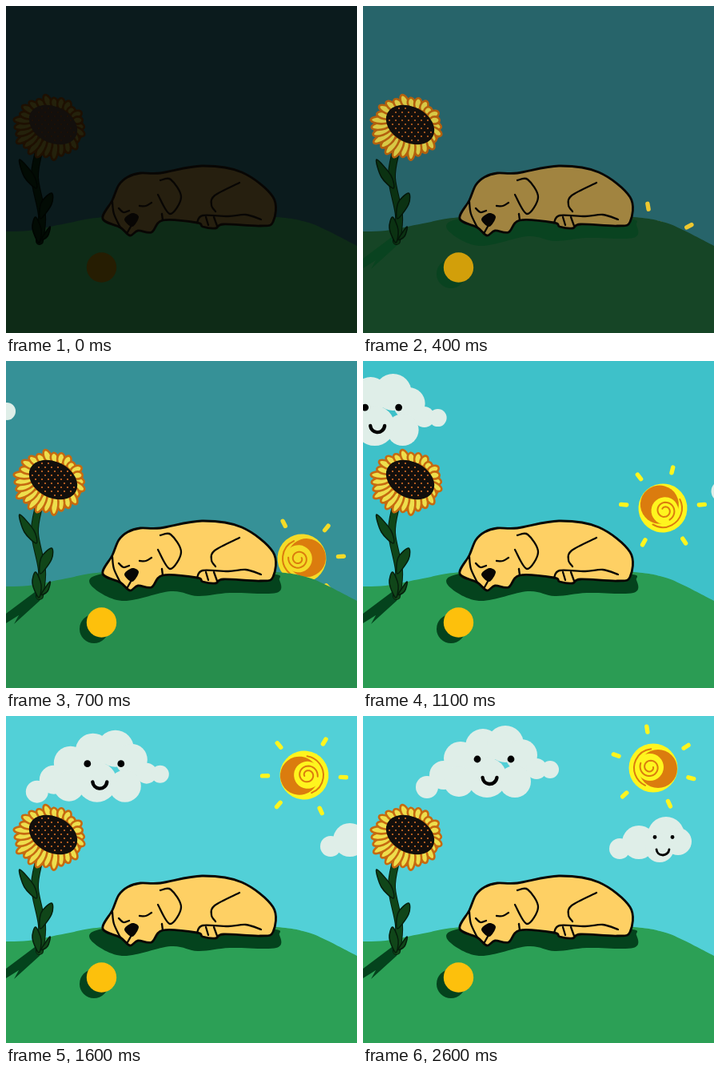
Write an HTML page with a canvas that moves like this. It is 439x409 px and loops after 3000 ms.

```html
<!DOCTYPE html>
<html lang="en">
<head>
<meta charset="utf-8">
<title>Sunny morning</title>
<style>
html, body { margin: 0; width: 100%; height: 100%; overflow: hidden; background: #0b1b1d; }
canvas { display: block; }
</style>
</head>
<body>
<canvas id="stage" width="439" height="409"></canvas>
<script>
const ctx = document.getElementById('stage').getContext('2d');
const LOOP = 3000, STEP = 100, LAST = 2600, NIGHT = 0.15;
const TAU = Math.PI * 2, RAD = Math.PI / 180, INK = '#080604';

const clamp = v => Math.min(1, Math.max(0, v));
const mix = (a, b, k) => a.map((v, i) => v + (b[i] - v) * k);
const rgb = c => `rgb(${c.map(Math.round).join(',')})`;
// Day colour, dimmed at night, fully lit at time `end`
const lit = (c, t, end) => rgb(c.map(v => v * (NIGHT + (1 - NIGHT) * clamp(t / end))));

// Straight runs between rows of [time, ...values]
function at(t, rows) {
  let i = 1;
  while (i < rows.length - 1 && rows[i][0] < t) i++;
  const [t0, ...a] = rows[i - 1], [t1, ...b] = rows[i];
  return mix(a, b, Math.min(1, (t - t0) / (t1 - t0)));
}

// Smooth curve through "x,y x,y ..." points
function curve(text, closed) {
  const p = text.split(' ').map(s => s.split(',').map(Number));
  const n = p.length, path = new Path2D();
  const get = i => closed ? p[(i + n) % n] : p[Math.min(n - 1, Math.max(0, i))];
  path.moveTo(...p[0]);
  for (let i = 0; i < (closed ? n : n - 1); i++) {
    const [a, b, c, d] = [get(i - 1), get(i), get(i + 1), get(i + 2)];
    path.bezierCurveTo(b[0] + (c[0] - a[0]) / 6, b[1] + (c[1] - a[1]) / 6,
      c[0] - (d[0] - b[0]) / 6, c[1] - (d[1] - b[1]) / 6, c[0], c[1]);
  }
  if (closed) path.closePath();
  return path;
}
const curves = (list, closed) => list.map(s => curve(s, closed));

function fill(path, color) { ctx.fillStyle = color; ctx.fill(path); }
function line(path, color, width) {
  ctx.strokeStyle = color;
  ctx.lineWidth = width;
  ctx.stroke(path);
}
function oval(x, y, rx, ry, turn = 0) {
  const path = new Path2D();
  path.ellipse(x, y, rx, ry, turn, 0, TAU);
  return path;
}
function arc(x, y, r, from, to) {
  const path = new Path2D();
  path.arc(x, y, r, from, to);
  return path;
}
const dot = (x, y, r, color) => fill(oval(x, y, r, r), color);

const skyLight = [[0, 11, 27, 29], [400, 39, 100, 106], [700, 54, 145, 151], [1100, 62, 193, 201], [1200, 82, 208, 215]];
const groundLight = [[0, 14, 43, 23], [400, 22, 69, 38], [700, 39, 142, 77], [1200, 44, 160, 86]];
const SHADE = 'rgb(4,67,29)';

const hill = curve('-10,282 28,281 75,272 122,264 230,258 338,264 375,270 400,280 439,300 450,306');
hill.lineTo(450, 420);
hill.lineTo(-10, 420);

const dog = {
  shade: curve('106,280 122,266 220,262 330,266 342,274 338,290 280,290 240,294 206,288 145,300', true),
  body: curve('168,209 193,209 245,200 295,208 334,239 334,270 318,275 272,273 262,278 246,276 239,271 196,268 182,283 165,281 155,287 143,277 121,266 133,243 141,224 152,214', true),
  lines: curves([
    '193,218 206,217 219,239 205,260 190,236',
    '133,245 135,260 143,277',
    '292,221 261,237 257,249 262,257',
    '239,271 246,262 278,263 300,261 319,267',
    '250,264 253,274', '260,264 264,275',
    '195,260 196,268', '157,274 152,283',
    '141,253 147,258 154,256', '167,250 175,250 182,246'
  ]),
  nose: curve('148,267 158,259 166,264 158,276', true)
};

const plant = {
  stem: curve('41,182 36,215 45,262 42,294'),
  leaves: curves(['38,228 23,214 17,192 35,212', '43,266 44,246 57,234 57,248', '41,296 33,278 37,264 44,280', '44,292 55,276 52,288'], true),
  shade: new Path2D('M46 290 L36 289 L0 316 V328 L16 318 L10 329 L42 300Z')
};

// Clouds are heaps of round puffs: x, y, radius
const bigCloud = {
  puffs: [[80, 89, 14], [101, 74, 18], [122, 53, 21], [150, 38, 22], [178, 35, 23], [198, 49, 20], [217, 66, 13], [234, 67, 11], [190, 82, 20], [155, 77, 25], [120, 82, 19]],
  x: 164, y: 54, eyeGap: 21, eye: 4.4, smile: [158.5, 76, 9], width: 4.4
};
const smallCloud = {
  puffs: [[321, 166, 13], [345, 158, 21], [379, 149, 23], [394, 157, 17], [371, 165, 18]],
  x: 376, y: 151.5, eyeGap: 11, eye: 2.4, smile: [375, 166, 8], width: 2.8
};

function drawCloud(cloud, dx, dy) {
  ctx.save();
  ctx.translate(dx, dy);
  cloud.puffs.forEach(p => dot(...p, '#dfeee8'));
  for (const side of [-1, 1]) dot(cloud.x + side * cloud.eyeGap, cloud.y, cloud.eye, '#000');
  line(arc(...cloud.smile, 0.1, Math.PI - 0.1), '#000', cloud.width);
  ctx.restore();
}

function drawClouds(t) {
  const u = Math.min(1, (t - 700) / 1200);
  drawCloud(bigCloud, -233 * (1 - u) ** 1.25, 7 * Math.sin(Math.PI * (1.2 * u - 0.2)));
  const left = (LAST - t) / STEP;
  drawCloud(smallCloud, 8.5 * left, -3 * clamp(left / 5));
}

// Time, x, y, turn in degrees
const sunPath = [[400, 365, 299, -886], [700, 370, 247, -738], [1100, 375, 184, -502], [1600, 373, 74, -196], [1900, 363, 65, 0]];
const rayAngles = [-99, -33, 15, 66, 137, 199];

function spiral(turns, r0, r1) {
  const path = new Path2D();
  for (let k = 0; k <= 1; k += 0.02) {
    const a = k * turns * TAU, r = r0 + (r1 - r0) * k;
    path.lineTo(r * Math.cos(a) - 4, r * Math.sin(a) - 1);
  }
  return path;
}
const swirl = spiral(1.6, 4, 13);

function drawSun(t) {
  const [x, y, turn] = at(t, sunPath);
  const yellow = rgb(mix([238, 200, 48], [255, 245, 30], clamp((t - 400) / 700)));
  const orange = '#db7c0e';
  ctx.save();
  ctx.translate(x, y);
  ctx.rotate(turn * RAD);
  dot(0, 0, 30.5, yellow);
  dot(6, 1, 24, orange);
  dot(-4, -1, 17, yellow);
  line(arc(0, 0, 24, 2, 4.6), orange, 2);
  line(swirl, orange, 2);
  for (const angle of rayAngles) {
    ctx.save();
    ctx.rotate(angle * RAD);
    line(new Path2D('M45.5 0 H52.5'), yellow, 5.4);
    ctx.restore();
  }
  ctx.restore();
}

function drawPlant(t) {
  const stem = lit([16, 70, 25], t, 600), vein = lit([6, 30, 12], t, 600);
  const petal = lit([238, 222, 76], t, 450), edge = lit([198, 106, 16], t, 450);
  const seed = lit([214, 112, 40], t, 450);

  line(plant.stem, vein, 10);
  line(plant.stem, stem, 8);
  plant.leaves.forEach(p => { fill(p, stem); line(p, vein, 1.5); });

  fill(oval(55, 152, 42, 36), edge);
  const petals = 26;
  for (let i = 0; i < petals; i++) {
    const a = i / petals * TAU, c = Math.cos(a), s = Math.sin(a);
    const reach = 0.95 + 0.05 * Math.sin(i * 2.4);
    const [x1, y1] = [59 + 25 * c, 148 + 20 * s], [x2, y2] = [54 + 46 * reach * c, 152 + 41 * reach * s];
    const shape = oval((x1 + x2) / 2, (y1 + y2) / 2, Math.hypot(x2 - x1, y2 - y1) / 2, 4.6, Math.atan2(y2 - y1, x2 - x1));
    fill(shape, petal);
    line(shape, edge, 2.6);
  }
  fill(oval(59, 148.5, 32, 22.5, 0.48), '#130f0c');
  // Seeds on a staggered grid inside the tilted disc
  for (let y = -20; y <= 20; y += 5) {
    for (let x = -30 + (y % 10 ? 4 : 0); x <= 30; x += 8) {
      const u = x * Math.cos(0.48) + y * Math.sin(0.48), v = y * Math.cos(0.48) - x * Math.sin(0.48);
      if (Math.hypot(u / 29, v / 19) < 1) dot(59 + x, 148 + y, 1.1, seed);
    }
  }
}

function drawDog(t) {
  fill(dog.body, lit([254, 208, 100], t, 700));
  line(dog.body, INK, 2.8);
  dog.lines.forEach(p => line(p, INK, 2.3));
  fill(dog.nose, INK);
}

function drawShadows(t) {
  ctx.globalAlpha = clamp(t / 600);
  [dog.shade, plant.shade, oval(110, 335, 18, 18)].forEach(p => fill(p, SHADE));
  ctx.globalAlpha = 1;
}

function draw(t) {
  ctx.lineCap = ctx.lineJoin = 'round';
  ctx.fillStyle = rgb(at(t, skyLight));
  ctx.fillRect(0, 0, 439, 409);
  drawSun(t);
  drawClouds(t);
  fill(hill, rgb(at(t, groundLight)));
  drawShadows(t);
  drawPlant(t);
  drawDog(t);
  dot(119.5, 327, 18.7, lit([253, 192, 12], t, 500));
}

const start = performance.now();
function tick() {
  const t = (performance.now() - start) % LOOP;
  draw(Math.min(LAST, Math.floor(t / STEP) * STEP));
  requestAnimationFrame(tick);
}
tick();
</script>
</body>
</html>
```
